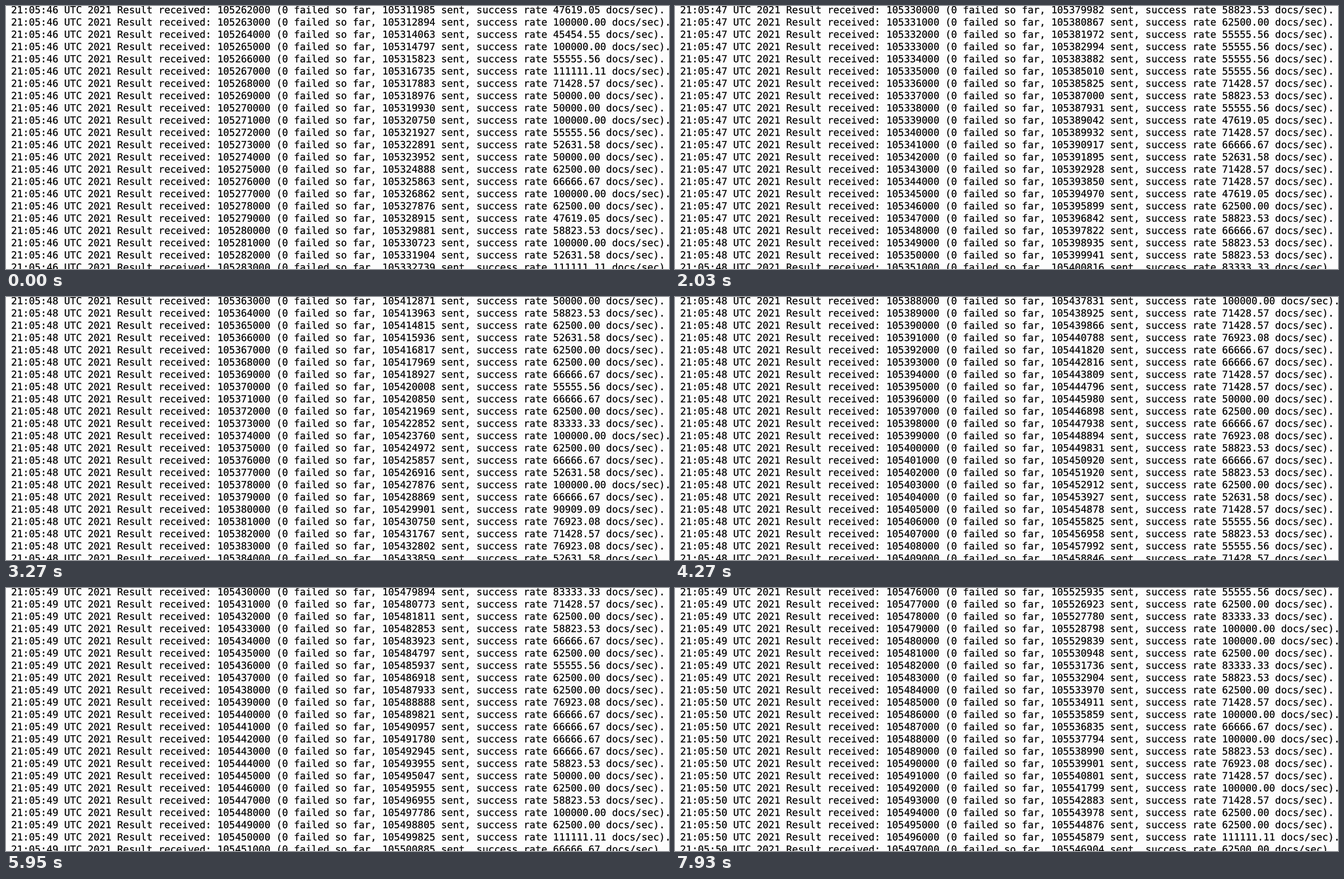
An HTML page that plays this animation: 1188x472 px, repeating every 8000 ms.

```html
<!DOCTYPE html>
<html lang="en">
<head>
<meta charset="utf-8">
<title>Log</title>
<style>
  html, body { margin: 0; width: 100%; height: 100%; overflow: hidden; background: #fdfdfd; }
  svg { display: block; }
  text {
    font: 17.54px "DejaVu Sans Mono", monospace;
    font-kerning: none;
    text-rendering: geometricPrecision;
    white-space: pre;
    fill: #000;
    stroke: #000;
    stroke-width: 0.25px;
  }
</style>
</head>
<body>
<svg id="stage" width="1188" height="472" viewBox="0 0 1188 472"></svg>
<script>
const LOOP = 8000, ROWS = 22, PITCH = 22, LEFT = 9.3, BASE = 13;

// Repaint count -> first visible line (in thousands of results)
const scroll = [[-2, 262], [0, 280], [34, 330], [60, 363], [82, 388],
                [104, 415], [132, 444], [161, 476]];

// Lines at which the clock advances one second
const ticks = [284, 348, 417, 484];

function rand(n) {
  const v = Math.sin(n * 12.9898) * 43758.5453;
  return v - Math.floor(v);
}

// Milliseconds per thousand results: mostly 14 to 18, now and then a fast batch
function duration(line) {
  if (rand(line + 0.25) < 0.12) return rand(line + 0.5) < 0.3 ? 9 : 10;
  const spread = rand(line + 0.5) + rand(line + 0.75) - 1;
  const mean = line < ticks[0] ? 19 : 16;
  return Math.round(mean + 5 * spread);
}

function logLine(line) {
  const ms = duration(line);
  const sec = 46 + ticks.filter(t => t <= line).length;
  const done = (105000 + line) * 1000;
  const sent = done + 49550 + 15 * ms + Math.floor(200 * rand(line));
  const rate = (1e6 / ms).toFixed(2);
  return `21:05:${sec} UTC 2021 Result received: ${done} (0 failed so far, ` +
         `${sent} sent, success rate ${rate} docs/sec).`;
}

// Three quick repaints in every 140 ms, after two long holds
function repaint(t) {
  if (t < 270) return -2;
  if (t < 470) return -1;
  const u = t - 470;
  return 3 * Math.floor(u / 140) + Math.min(2, Math.floor(u % 140 / 20));
}

function topLine(step) {
  const i = Math.max(1, scroll.findIndex(([s]) => s >= step));
  const [s0, l0] = scroll[i - 1], [s1, l1] = scroll[i];
  return Math.round(l0 + (l1 - l0) * (step - s0) / (s1 - s0));
}

const stage = document.getElementById("stage");
const rows = Array.from({ length: ROWS }, (_, i) => {
  const row = document.createElementNS(stage.namespaceURI, "text");
  row.setAttribute("x", LEFT);
  row.setAttribute("y", BASE + i * PITCH);
  return stage.appendChild(row);
});

let shown = null;
function draw(t) {
  const top = topLine(repaint(t));
  if (top === shown) return;
  shown = top;
  rows.forEach((row, i) => { row.textContent = logLine(top + i); });
}

const begin = performance.now();
function loop() {
  draw((performance.now() - begin) % LOOP);
  requestAnimationFrame(loop);
}
loop();
</script>
</body>
</html>
```
